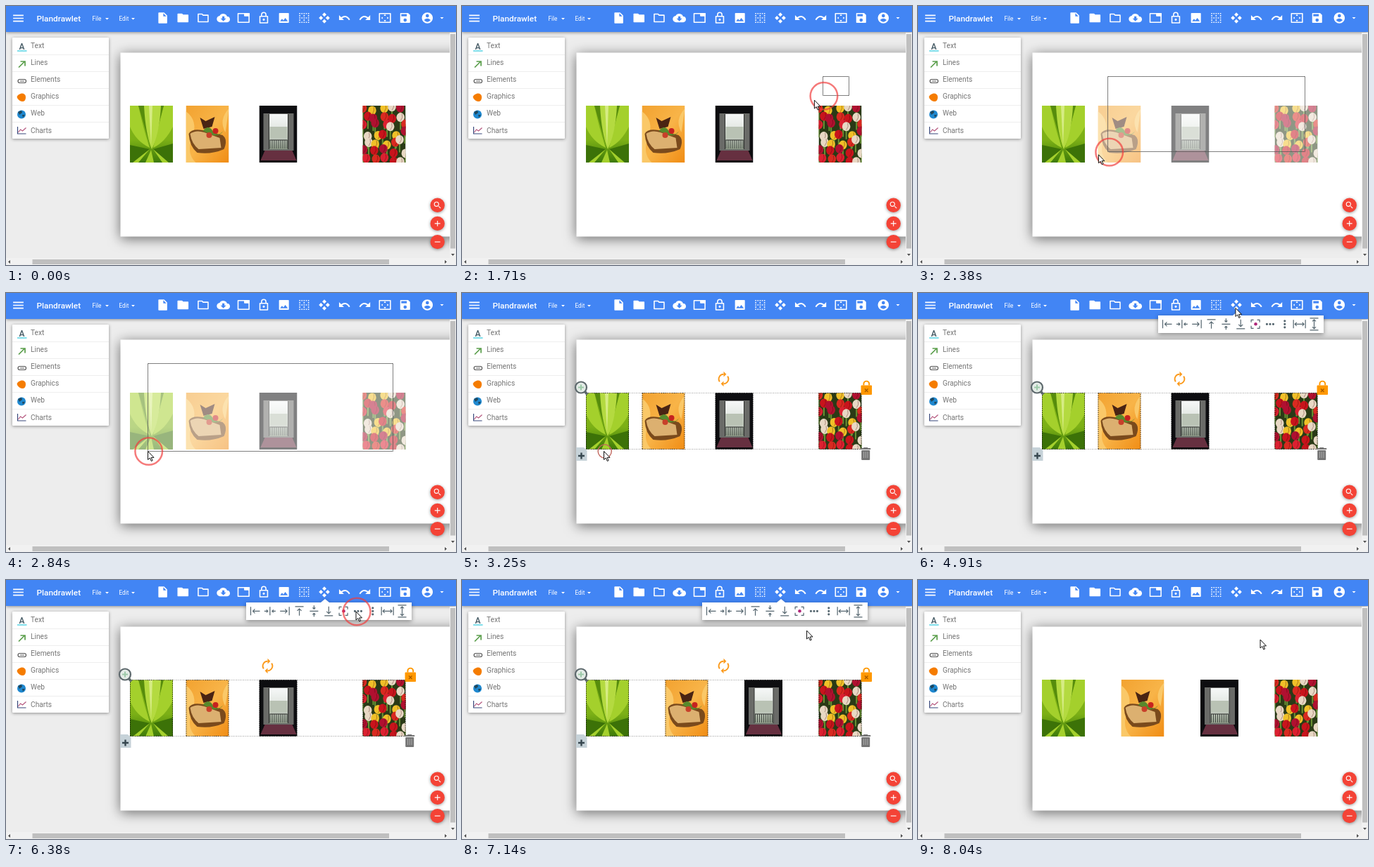
Animation of 639x369 px, one loop 8.19 s. Source, as an HTML page:

```html
<!DOCTYPE html>
<html lang="en">
<head>
<meta charset="utf-8">
<title>Design editor</title>
<style>
html, body { margin: 0; width: 100%; height: 100%; overflow: hidden; background: #ededed; }
svg { display: block; }
text { font-family: Roboto, Arial, sans-serif; }
#side text { font-size: 10.2px; fill: #757575; }
#bar, #fabs { color: #fff; }
.soft { filter: drop-shadow(0 1px 2px rgba(0,0,0,.4)); }
.solid { fill: currentColor; stroke: currentColor; stroke-width: 2; stroke-linejoin: round; }
.line { fill: none; stroke: currentColor; stroke-width: 2; stroke-linejoin: round; }
.hole { fill: #4285f4; }
.edge { fill: none; stroke: #000; stroke-opacity: .75; stroke-width: 2; stroke-dasharray: 1.5; }
</style>
</head>
<body>
<svg width="639" height="369" viewBox="0 0 639 369">
  <defs>
    <linearGradient id="leafBg" x2="0" y2="1">
      <stop offset="0" stop-color="#86b51c"/><stop offset=".6" stop-color="#7cb016"/><stop offset="1" stop-color="#3d7a08"/>
    </linearGradient>
    <linearGradient id="clothBg" x2="1" y2="1">
      <stop offset="0" stop-color="#f2a230"/><stop offset=".5" stop-color="#f8b448"/><stop offset="1" stop-color="#f08c14"/>
    </linearGradient>
    <linearGradient id="sky" x2="0" y2="1">
      <stop offset="0" stop-color="#f6f8f8"/><stop offset=".5" stop-color="#dfe4de"/><stop offset="1" stop-color="#8f9c88"/>
    </linearGradient>
  </defs>

  <rect width="639" height="369" fill="#ededed"/>
  <rect x="162.500" y="66.500" width="500" height="262" fill="#fff" style="filter:drop-shadow(0 3px 9px rgba(0,0,0,.55))"/>

  <!-- photos -->
  <svg id="plant" y="142" width="61" height="81">
    <rect width="61" height="81" fill="url(#leafBg)"/>
    <path d="M0 0H12Q18 30 28 60 8 50 0 30ZM48 0H61V30Q50 52 33 60Z" fill="#a4d02c"/>
    <path d="M12 0H20L28 56ZM44 0H48L33 56Z" fill="#568c0c"/>
    <path d="M20 0H44Q42 40 31 62 22 40 20 0Z" fill="#b4da40"/>
    <path d="M27 0H32L30 58Z" fill="#d6ec84"/>
    <path d="M0 56L28 62 10 81H0ZM33 62L61 54V81H48Z" fill="#3c7208"/>
    <path d="M28 62L4 81H12ZM30 63L22 81H34ZM33 62L46 81H55Z" fill="#a4d02c"/>
  </svg>
  <svg id="cake" y="142" width="61" height="81">
    <rect width="61" height="81" fill="url(#clothBg)"/>
    <path d="M0 8Q18 22 9 45T14 81H0ZM61 4Q46 20 56 38Z" fill="#fac868"/>
    <path d="M4 40Q8 32 24 35L52 42Q60 48 54 62 36 70 16 67 5 58 4 40Z" fill="#7a4a1c"/>
    <path d="M6 40Q14 34 26 38L48 46 50 60 18 62Q8 54 6 40Z" fill="#dcb070"/>
    <path d="M20 17L28 22 41 16 37 30 25 33Z" fill="#4a2413"/>
    <path d="M24 36Q32 26 38 36T53 36Q48 44 38 42Z" fill="#58892c"/>
    <circle cx="33" cy="42" r="4" fill="#c8402a"/><circle cx="42" cy="36" r="4" fill="#c6221f"/>
  </svg>
  <svg id="window" y="142" width="54" height="81">
    <rect width="54" height="81" fill="#0d0d10"/>
    <path d="M6 11H49V64H6Z" fill="#6a6b68"/>
    <path d="M14 12H41V62H14Z" fill="url(#sky)"/>
    <path d="M15 30H40V46H15Z" fill="#b9c2b4"/>
    <path d="M15 55H40" stroke="#454b46" stroke-width="12" stroke-dasharray="1 2"/>
    <path d="M14 12V62M41 12V62M15 49H40" stroke="#2c2e2c"/>
    <path d="M8 64H47L53 78H2Z" fill="#663040"/>
  </svg>
  <svg id="tulips" y="142" width="61" height="81">
    <rect width="61" height="81" fill="#2a3a16"/>
  </svg>

  <g id="sel">
    <path d="M177 142.500H567M177 222.500H567" stroke="#999" stroke-dasharray="1 1.500"/>
    <path d="M174 140l4 4.500" stroke="#5d686c" stroke-width="3.500"/>
    <circle cx="169" cy="134.500" r="8" fill="#e3ebe6" stroke="#5d686c" stroke-width="2.200"/>
    <path d="M169 130.500v8M165 134.500h8" stroke="#9cc9a8" stroke-width="2"/>
    <path d="M162 220h11l4.500 4.500v14.500h-15.500z" fill="#c6d2d8"/>
    <path d="M169.500 227.500v9M165 232h9" stroke="#37474f" stroke-width="2.400"/>
  </g>
  <rect id="marquee" x="0" y="100.500" fill="none" stroke="#555" stroke-dasharray="1.500 .5"/>

  <g id="side">
    <rect class="soft" x="9" y="45" width="137" height="144" rx="1" fill="#fff"/>
    <text x="22.500" y="61.500" text-anchor="middle" style="font-size:12px;font-weight:500;fill:#455a64">A</text>
    <path d="M16 64h13.500" stroke="#80deea" stroke-width="2"/>
    <path d="M18 87.500l8-8M20.500 79h6.500v6.500" fill="none" stroke="#5a9e4b" stroke-width="1.700"/>
    <rect x="17" y="104.500" width="11.500" height="5" rx="2.500" fill="none" stroke="#555" stroke-width="1.200"/>
    <path d="M20 107h6" stroke="#555"/>
    <path d="M22 124.500q6 0 6 5.500t-4 6-7.500-4 5.500-7.500z" fill="#f57c00"/>
    <circle cx="22" cy="154.500" r="6" fill="#1e88d0"/>
    <path d="M17 151l5-2 1 3-4 3zM23 155h4l-3 4z" fill="#21475c"/>
    <path d="M16.500 172v10h12" fill="none" stroke="#37477a" stroke-width="1.200"/>
    <path d="M17.500 180l3-4 3 2 5-4.500" fill="none" stroke="#b5577e" stroke-width="1.200"/>
  </g>

  <rect class="soft" width="639" height="37" fill="#4285f4"/>
  <g fill="#fff">
    <text x="43.500" y="22" font-size="11.800" font-weight="500">Plandrawlet</text>
    <text x="122.500" y="21" font-size="8.200">File</text>
    <text x="160.500" y="21" font-size="8.200">Edit</text>
    <path d="M141 17h5l-2.500 2.500zM178 17h5l-2.500 2.500zM616.500 16h5l-2.500 2.500z"/>
  </g>
  <g id="bar"></g>

  <!-- scroll bars -->
  <path d="M630 38h9v331h-639v-10h630z" fill="#f1f1f1"/>
  <path d="M631 40h7v305.500h-7zM37.500 361h506.500v7h-506.500z" fill="#bfbfbf"/>
  <path d="M632 353h5l-2.500 3zM6 362v5l-3-2.500zM623 362v5l3-2.500z" fill="#505050"/>

  <g id="fabs"></g>

  <g id="tip">
    <rect x="423.500" y="32" width="57" height="13" rx="1.500" fill="#323232"/>
    <text x="452" y="41" font-size="7.300" font-weight="500" fill="#fff" text-anchor="middle">Align Elements</text>
  </g>
  <g id="menu" color="#55666f">
    <path d="M341 32h106l6-5 6 5h117v25h-235z" fill="#fff" style="filter:drop-shadow(0 2px 3px rgba(0,0,0,.4))"/>
  </g>
  <circle id="ring" fill="none"/>
  <path id="cursor" d="M0 0V12L2.800 9.500 4.800 14 6.600 13.200 4.700 8.900H8.500Z" fill="#fff" stroke="#111"/>
</svg>
<script>
const $ = id => document.getElementById(id);
const add = (id, markup) => $(id).insertAdjacentHTML('beforeend', markup);
const set = (id, attrs) => { for (const k in attrs) $(id).setAttribute(k, attrs[k]); };
const show = (id, alpha) => set(id, { opacity: +alpha });

// Icons are drawn on a 24 px grid.
const shape = kind => d => `<path class="${kind}" d="${d}"/>`;
const solid = shape('solid'), line = shape('line'), hole = shape('hole');
const dot = (y, r, kind = 'hole') => `<circle class="${kind}" cx="12" cy="${y}" r="${r}"/>`;
const spin = (turn, part) => `<g transform="rotate(${turn} 12 12)">${part}</g>`;
const fourWays = part => [0, 90, 180, 270].map(a => spin(a, part)).join('');
const icon = (part, x, y, size = .78, color = '') =>
  `<g transform="translate(${x} ${y}) scale(${size}) translate(-12 -12)" ${color && `color="${color}"`}>${part}</g>`;

const folder = 'M3 5h7l2 2h9v12H3z', frame = 'M2 4h20v16H2z';
const undo = '<path d="M4 14Q14 4 21 15.500" class="line" style="stroke-width:2.600"/>' +
  '<path d="M2 7v9h9z" fill="currentColor"/>';
const dots = [0, 1, 2, 3, 4].map(r =>
  `<path class="line" d="M3 ${4 + r * 4}h18" stroke-dasharray="${r % 2 ? '2 6' : 2}"/>`).join('');

const tools = [
  solid('M5 3h9l5 5v13H5z') + hole('M13 3.500V9h5.500z'),
  solid(folder),
  line(folder),
  solid('M6 19a5 5 0 0 1 0-10 6.500 6.500 0 0 1 12 1 4.500 4.500 0 0 1 1 9z') + hole('M12 18l-5-5h3V9h4v4h3z'),
  line(frame) + solid('M14 4h8v4h-8z'),
  line('M5 9h14v12H5zM8 8V6a4 4 0 0 1 8 0v3') + dot(15, 1, 'solid'),
  solid('M4 4h16v16H4z') + hole('M5 18l3.500-4.500 2.500 3 3.500-4.500 4.500 6z'),
  dots,
  fourWays('<path d="M12 2l3.800 3.800-3.800 3.800-3.800-3.800z" fill="currentColor"/>'),
  undo,
  `<g transform="matrix(-1 0 0 1 24 0)">${undo}</g>`,
  line(frame) + fourWays('<path d="M12 5l2 3h-4z" fill="currentColor"/>'),
  solid('M4 4h13l3 3v13H4z') + hole('M5 5h10v4H5z') + dot(16, 3)
];
tools.forEach((part, i) => add('bar', icon(part, 222.6 + i * 28.68, 17)));
add('bar', icon(line('M3 7h18M3 12h18M3 17h18'), 17.5, 17.5, .82));
add('bar', icon(dot(12, 9, 'solid') + dot(8, 3) + hole('M6 16q6-6 12 0-6 6.500-12 0z'), 598.3, 17));

['Text', 'Lines', 'Elements', 'Graphics', 'Web', 'Charts'].forEach((name, i) => {
  add('side', `<text x="35" y="${60 + i * 24.1}">${name}</text>`);
  if (i) add('side', `<path d="M9 ${45.5 + i * 24}h137" stroke="#eee"/>`);
});

[line('M15 15l5 5M15 9.500a5.500 5.500 0 1 1-11 0 5.500 5.500 0 1 1 11 0z'), line('M5 12h14M12 5v14'), line('M5 12h14')]
  .forEach((part, i) => {
    const y = 283.7 + i * 26.2;
    add('fabs', `<circle class="soft" cx="612.700" cy="${y}" r="10.200" fill="#f44336"/>` + icon(part, 612.7, y, .56));
  });

const arc = line('M6.200 16A7 7 0 0 1 12 5') + '<path d="M12 1l4 4-4 4z" fill="currentColor"/>';
add('sel',
  icon(arc + spin(180, arc), 371.5, 122.5, .97, '#fb9a1c') +
  icon(solid('M5 9h14v12H5z') + line('M8 8V6a4 4 0 0 1 8 0v2'), 574.3, 135.3, .97, '#ff9800') +
  '<path d="M572 136.500l4.500 4.500m0-4.500l-4.500 4.500" stroke="#a85a00" stroke-width="1.300"/>' +
  icon(solid('M7 8h10v12H7z') + line('M5 5h14M9 4h6'), 573.2, 229, 1, '#757575') +
  '<path d="M570.500 226v9m2.700-9v9m2.800-9v9" stroke="#bbb" stroke-width=".8"/>');

// Alignment menu: a few glyphs, turned for the other directions.
const toEdge = 'M-6.500-6v12M6.500 0H-3.500m3-3l-3 3 3 3';
const toMid = 'M0-6v12M-8 0h5m-2-2l2 2-2 2M8 0h-5m2-2l-2 2 2 2';
const spread = 'M-8.500-6v12M8.500-6v12M-6.500 0h13m-10.500-2.500l-2.500 2.500 2.500 2.500m8-5l2.500 2.500-2.500 2.500';
const corners = 'M-6-2.500v-3.500h3.500m5 0h3.500v3.500m0 5v3.500h-3.500m-5 0h-3.500v-3.500';
const row = 'M-4.500 0h.01M0 0h.01M4.500 0h.01';
[[toEdge], [toMid], [toEdge, 180], [toEdge, 90], [toMid, 90], [toEdge, -90],
 [corners], [row], [row, 90], [spread], [spread, 90]].forEach(([d, turn = 0], i) =>
  add('menu', `<path class="line" d="${d}" stroke-linecap="${d == row ? 'round' : 'butt'}"
    style="stroke-width:${d == row ? 3.2 : 1.2}" transform="translate(${354 + i * 20.85} 44.300) rotate(${turn})"/>`));
add('menu', '<circle cx="479.500" cy="44.300" r="2.300" fill="#b0287a"/>');

// Flower bed: jittered rows of blooms.
let seed = 11;
const rnd = () => (seed = seed * 16807 % 2147483647) / 2147483647;
const petals = ['#c8141c', '#d92a20', '#f0c028', '#b01030', '#e8d8c4', '#dc2030'];
for (let i = 0; i < 35; i++) {
  const x = i % 5 * 13 + rnd() * 9, y = (i / 5 | 0) * 12 + rnd() * 8;
  add('tulips', `<path d="M${x} ${y}v18" stroke="#6a9434" stroke-width="2"/>
    <ellipse cx="${x}" cy="${y}" rx="5.800" ry="6.500" fill="${petals[rnd() * petals.length | 0]}"/>
    <path d="M${x + 2} ${y - 5}q2 5-2 10" stroke="#400" stroke-opacity=".35" fill="none"/>`);
}

const LOOP = 8190, LEFT = 176, RIGHT = 567.5;
const photos = [['plant', LEFT, 61], ['cake', 255.5, 61], ['window', 359.5, 54], ['tulips', RIGHT - 61, 61]];
const gap = (RIGHT - LEFT - photos.reduce((sum, p) => sum + p[2], 0)) / (photos.length - 1);
for (const [id] of photos) add(id, '<rect class="edge" width="100%" height="100%"/>');

// Pointer moves: start, end, from, to, bend of the path.
const moves = [
  [380, 1180, [459, 89], [550, 101]],
  [1400, 2710, [550, 101], [201.5, 225.5], .68],
  [3250, 3850, [201.5, 225.5], [450, 21]],
  [4850, 5580, [450, 21], [497, 45]],
  [6800, 7350, [497, 45], [486, 85]]
];
const presses = [[1530, 3120], [4500, 4600], [6350, 6500], [7700, 7760]];
const CLOSE = 260;

const clamp = v => Math.min(1, Math.max(0, v));
const fade = (t, from, to) => clamp(Math.min((t - from) / 150, (to + 150 - t) / 150));

function pointer(t) {
  const [start, end, from, to, bend = 1] = moves.findLast(m => t >= m[0]) || moves[0];
  const u = clamp((t - start) / (end - start)), k = u * u * (3 - 2 * u);
  return [from[0] + (to[0] - from[0]) * k, from[1] + (to[1] - from[1]) * k ** bend];
}

function draw(t) {
  const [x, y] = pointer(t), [lx, ly] = pointer(t - 45);
  set('cursor', { transform: `translate(${x} ${y})` });
  show('cursor', t >= 430);

  const press = presses.find(([down, up]) => t >= down && t < up + CLOSE);
  show('ring', !!press);
  if (press) {
    const open = 1 - clamp((t - press[1]) / CLOSE);
    set('ring', { cx: lx + 1.2, cy: ly, r: 19.3 * open,
      stroke: open < 1 ? '#c0655c' : 'rgba(240,60,60,.68)', 'stroke-width': .3 + 2.2 * open });
  }

  const dragging = t >= 1530 && t < 3250;
  const selected = t >= 3250 && t < 7740;
  show('marquee', dragging);
  show('sel', selected);
  if (dragging) {
    const left = Math.round(lx) - .5;
    set('marquee', { x: left, width: 549.5 - left, height: Math.round(ly - 101) });
  }

  let even = LEFT;
  for (const [id, left, width] of photos) {
    set(id, { x: t < 6610 ? left : even });
    even += width + gap;
    show(id, dragging && lx < left + width && ly > 142 ? .52 : 1);
    $(id).lastElementChild.setAttribute('opacity', +selected);
  }

  show('tip', fade(t, 3880, 4700));
  show('menu', fade(t, 4720, 7700));
}

const start = performance.now();
(function loop() {
  draw((performance.now() - start) % LOOP);
  requestAnimationFrame(loop);
})();
</script>
</body>
</html>
```
